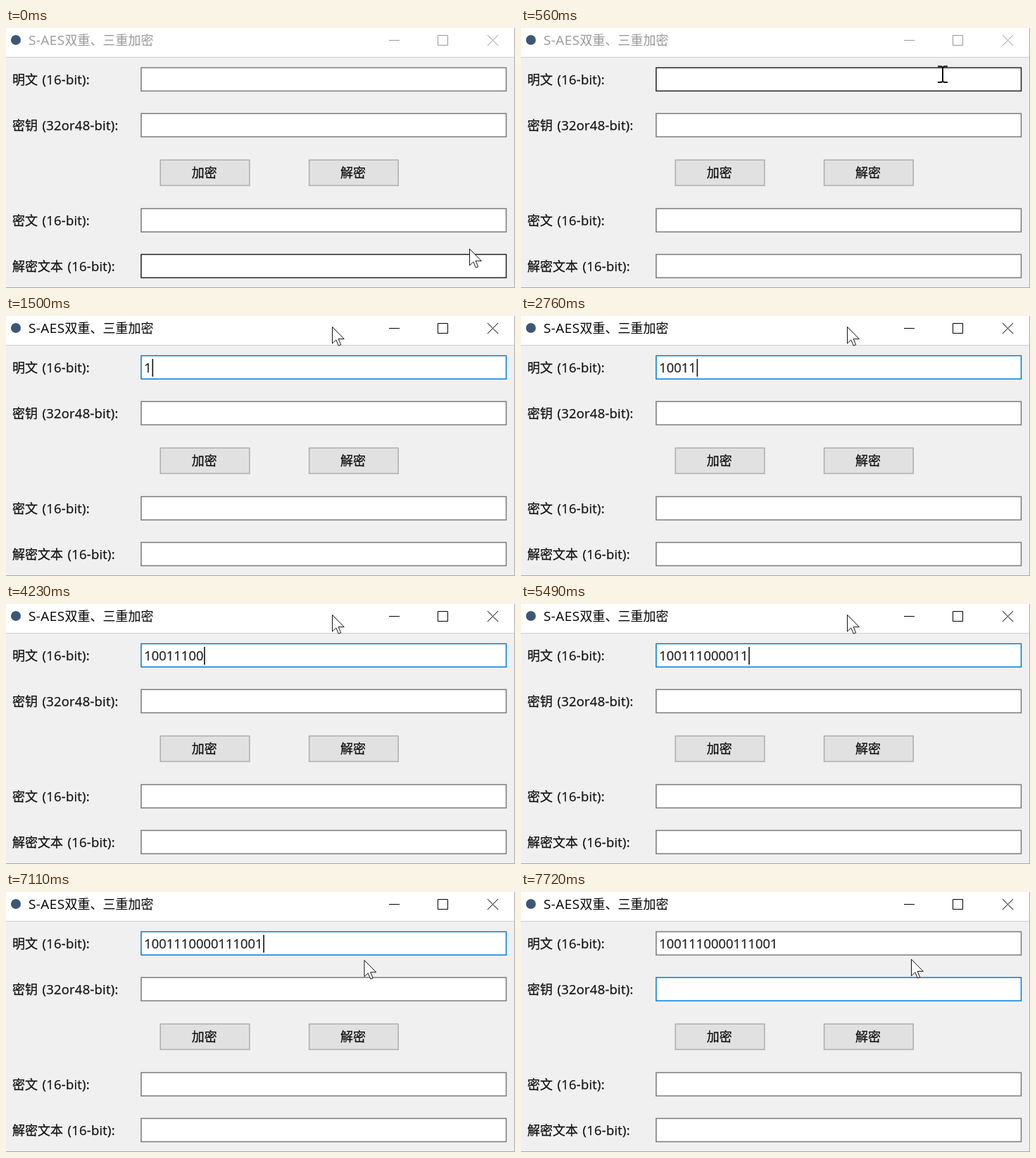
These frames come from a looping animation (723x369 px, 8000 ms). An HTML page:

```html
<!DOCTYPE html>
<html lang="zh">
<head>
<meta charset="utf-8">
<title>S-AES</title>
<style>
  html, body { margin: 0; width: 100%; height: 100%; overflow: hidden; background: #fff; }
  svg { display: block; width: 723px; height: 369px; }
  text { font: 18px "Noto Sans CJK SC", "Noto Sans CJK", sans-serif; fill: #111; white-space: pre; }
  .latin { font-family: "Open Sans", "Noto Sans", sans-serif; font-size: 18.5px; letter-spacing: .2px; word-spacing: 1.5px; }
  .digits { font-family: "Open Sans", "Noto Sans", sans-serif; font-size: 18.4px; fill: #222; }
  #form text, .digits { stroke: #111; stroke-width: .25; }
  #bar text { fill: currentColor; }
  #bar .latin { font-size: 19px; letter-spacing: .4px; }
  .field { fill: #fff; stroke-width: 1.5; }
  .button { fill: #e1e1e1; stroke: #adadad; stroke-width: 1.5; }
</style>
</head>
<body>
<svg viewBox="0 0 723 369">
  <rect width="723" height="369" fill="#f0f0f0"/>
  <rect width="723" height="41" fill="#fff"/>
  <path d="M0 41.5H723" stroke="#cfcfcf"/>
  <path d="M722.5 0V368.5H0" fill="none" stroke="#a8a8a8"/>
  <circle cx="14" cy="17" r="7" fill="#3b5876"/>
  <rect id="glow" x="517" width="69" height="41" fill="#e5e5e5"/>
  <g id="bar">
    <text x="32" y="24"><tspan class="latin">S-AES</tspan>双重、三重加密</text>
    <path d="M544 17.5h15M613.5 10.5h14v14h-14zM684 10l15 15M699 10l-15 15" fill="none" stroke="currentColor"/>
  </g>
  <g id="form"></g>
  <text id="typed" class="digits" x="196.3" y="80"></text>
  <rect id="caret" width="1.6" height="25" fill="#111"/>
  <path id="arrow" d="M.5 .5V24L5.8 18.9L9.4 27.2L12.7 25.8L9.2 17.6H17.3Z" fill="#fff" stroke="#111"/>
  <path id="beam" d="M-7 -11.5H-2L0 -10L2 -11.5H7M0 -10V10M-7 11H-2L0 9.5L2 11H7" fill="none" stroke="#111" stroke-width="2"/>
</svg>
<script>
const LOOP = 8000;
const STEP = 70;
const BITS = '1001110000111001';
const LABELS = [['明文', '16'], ['密钥', '32or48'], ['密文', '16'], ['解密文本', '16']];
const CLICKS = [830, 7250];

// pointer key points: time, x, y
const PATH = [
  [70, 658, 313], [560, 599, 66], [830, 599, 66], [970, 463, 15],
  [6770, 463, 15], [7260, 538, 149], [7400, 540, 139], [7510, 540, 139], [7720, 554, 95]
];

// two runs of eight evenly timed key presses
const run = (from, to) => Array.from({ length: 8 }, (_, i) => from + (to - from) * i / 7);
const KEYS = [...run(1500, 3560), ...run(5030, 6090)];

const $ = id => document.getElementById(id);
const form = $('form');
const rowTop = i => 56.4 + 65 * i + (i > 1 ? 70 : 0);
const show = (el, on) => el.setAttribute('visibility', on ? 'visible' : 'hidden');
const clamp = v => Math.min(1, Math.max(0, v));
const smooth = u => u * u * (3 - 2 * u);

function add(tag, attrs, text = '', parent = form) {
  const el = document.createElementNS('http://www.w3.org/2000/svg', tag);
  for (const key in attrs) el.setAttribute(key, attrs[key]);
  el.textContent = text;
  return parent.appendChild(el);
}

const fields = LABELS.map(([han, bits], i) => {
  const y = rowTop(i);
  const label = add('text', { x: 9, y: y + 23.4 }, han);
  add('tspan', { class: 'latin' }, ` (${bits}-bit):`, label);
  return add('rect', { class: 'field', x: 192, y, width: 518.5, height: 33 });
});

['加密', '解密'].forEach((name, i) => {
  const x = 219.3 + 211.3 * i;
  add('rect', { class: 'button', x, y: 187.3, width: 126.6, height: 36.2 });
  add('text', { x: x + 62.5, y: 212.3, 'text-anchor': 'middle' }, name);
});

// eased between key points, moving in steps like a screen recording
function pointer(t) {
  const next = PATH.findIndex(point => point[0] > t);
  if (next < 1) return next ? PATH.at(-1).slice(1) : PATH[0].slice(1);
  const [t0, x0, y0] = PATH[next - 1];
  const [t1, x1, y1] = PATH[next];
  const u = smooth(Math.floor((t - t0) / STEP) * STEP / (t1 - t0));
  return [x0 + (x1 - x0) * u, y0 + (y1 - y0) * u];
}

// the blink restarts at the latest click or key press
function caretOn(t) {
  const last = Math.max(...[...CLICKS, ...KEYS].filter(time => time <= t));
  return t >= CLICKS[0] && (t - last + 200) % 870 < 600;
}

function draw(t) {
  const [x, y] = pointer(t);
  const focus = CLICKS.filter(time => time <= t).length - 1;
  const over = fields.findIndex((_, i) => y >= rowTop(i) && y <= rowTop(i) + 33);
  const hover = t < PATH[0][0] ? 3 : over;

  fields.forEach((field, i) => field.setAttribute('stroke',
    i === focus ? '#0078d7' : i === hover ? '#222' : '#7a7a7a'));
  $('bar').setAttribute('color', focus < 0 ? '#999' : '#000');
  $('glow').setAttribute('opacity', t < 900 ? 0 : clamp((1240 - t) / 270));

  const count = KEYS.filter(time => time <= t).length;
  $('typed').textContent = BITS.slice(0, count);
  $('caret').setAttribute('x', 197 + (focus ? 0 : count * 10.52));
  $('caret').setAttribute('y', rowTop(Math.max(focus, 0)) + 4.6);
  show($('caret'), caretOn(t));

  for (const id of ['arrow', 'beam']) {
    $(id).setAttribute('transform', `translate(${x} ${y})`);
    show($(id), (id === 'beam') === over >= 0);
  }
}

const start = performance.now();
function tick() {
  draw((performance.now() - start) % LOOP);
  requestAnimationFrame(tick);
}
tick();
</script>
</body>
</html>
```
